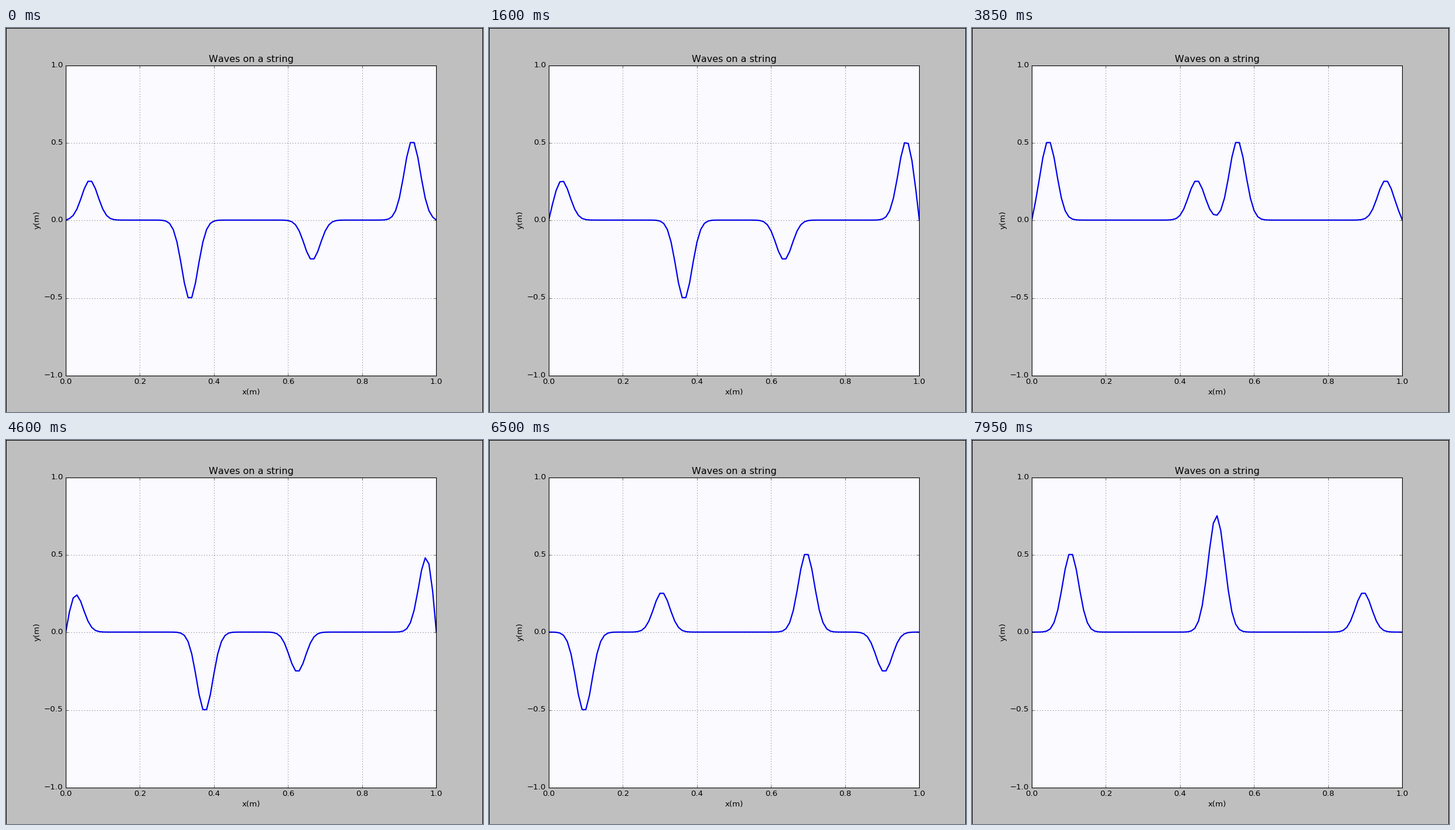
Write a matplotlib script that moves like this. It is 814 px wide and 655 px high and loops after 8000 ms.

```python
import matplotlib.pyplot as plt
import numpy as np
from matplotlib.animation import FuncAnimation
from matplotlib.patches import Rectangle
from matplotlib.transforms import ScaledTranslation

W, H, DPI = 814, 655, 80
FRAMES, INTERVAL = 160, 50
LEFT, RIGHT, TOP, BOTTOM = 102, 734.4, 63.9, 592.9

plt.rcParams.update({
    "font.family": "DejaVu Sans",
    "font.size": 12,
    "text.kerning_factor": 6,
    "axes.titlesize": 14.4,
    "axes.titlepad": 5,
    "axes.labelpad": 5,
    "axes.linewidth": 1.0,
    "axes.axisbelow": False,
    "xtick.top": True,
    "ytick.right": True,
    "ytick.alignment": "center",
    "lines.scale_dashes": False,
    "lines.dotted_pattern": [1, 3],
})


def pulse(x, centre, height):
    return height * np.exp(-1000 * (x - centre) ** 2)


def solve(y, count):
    """Leapfrog wave equation with fixed ends, starting at rest."""
    y[0] = y[-1] = 0
    old, states = y, [y]
    for _ in range(count):
        new = np.zeros_like(y)
        new[1:-1] = y[2:] + y[:-2] - old[1:-1]
        old, y = y, new
        states.append(y)
    return states


def solver_step(frame):
    """Nearly steady pace with one short pause, eased through a few keys."""
    seconds = [0, 0.5, 0.6, 1.6, 2.7, 3.85, 5.4, 6.5, 7.45, 7.95]
    steps = [63, 88, 88, 133, 179, 225, 312, 360, 395, 419]
    return round(np.interp(frame * INTERVAL / 1000, seconds, steps))


x = np.linspace(0, 1, 101)
waves = solve(pulse(x, 0.3, 1.0) + pulse(x, 0.7, 0.5),
              solver_step(FRAMES - 1))

fig = plt.figure(figsize=(W / DPI, H / DPI), dpi=DPI, facecolor="#bfbfbf")
for corner, w, h in [((0, 0), 1 / W, 1), ((1 - 1 / W, 0), 1 / W, 1),
                     ((0, 1 - 1 / H), 1, 1 / H)]:
    fig.add_artist(Rectangle(corner, w, h, facecolor="black", linewidth=0,
                             antialiased=False))

ax = fig.add_axes([LEFT / W, 1 - BOTTOM / H,
                   (RIGHT - LEFT) / W, (BOTTOM - TOP) / H],
                  facecolor="#fafaff")
ax.set(xlim=(0, 1), ylim=(-1, 1), xlabel="x(m)", ylabel="y(m)",
       xticks=np.linspace(0, 1, 6), yticks=np.linspace(-1, 1, 5))
ax.tick_params(direction="in", length=4, width=0.5, pad=4)
ax.set_title("Waves on a string", y=1.0)
ax.grid(color="black", linestyle=":", linewidth=0.5)
string, = ax.plot(x, waves[solver_step(0)], color="#0000f0", linewidth=2)

# The frame and grid snap to whole pixels; curve and text sit a little higher.
lift = ScaledTranslation(0, 0.75 / DPI, fig.dpi_scale_trans)
for artist in [string, ax.title, ax.yaxis.label,
               *ax.get_xticklabels(), *ax.get_yticklabels()]:
    artist.set_transform(artist.get_transform() + lift)


def update(frame):
    string.set_ydata(waves[solver_step(frame)])
    return string,


anim = FuncAnimation(fig, update, frames=FRAMES, interval=INTERVAL,
                     repeat=True, repeat_delay=0)
plt.show()
```
